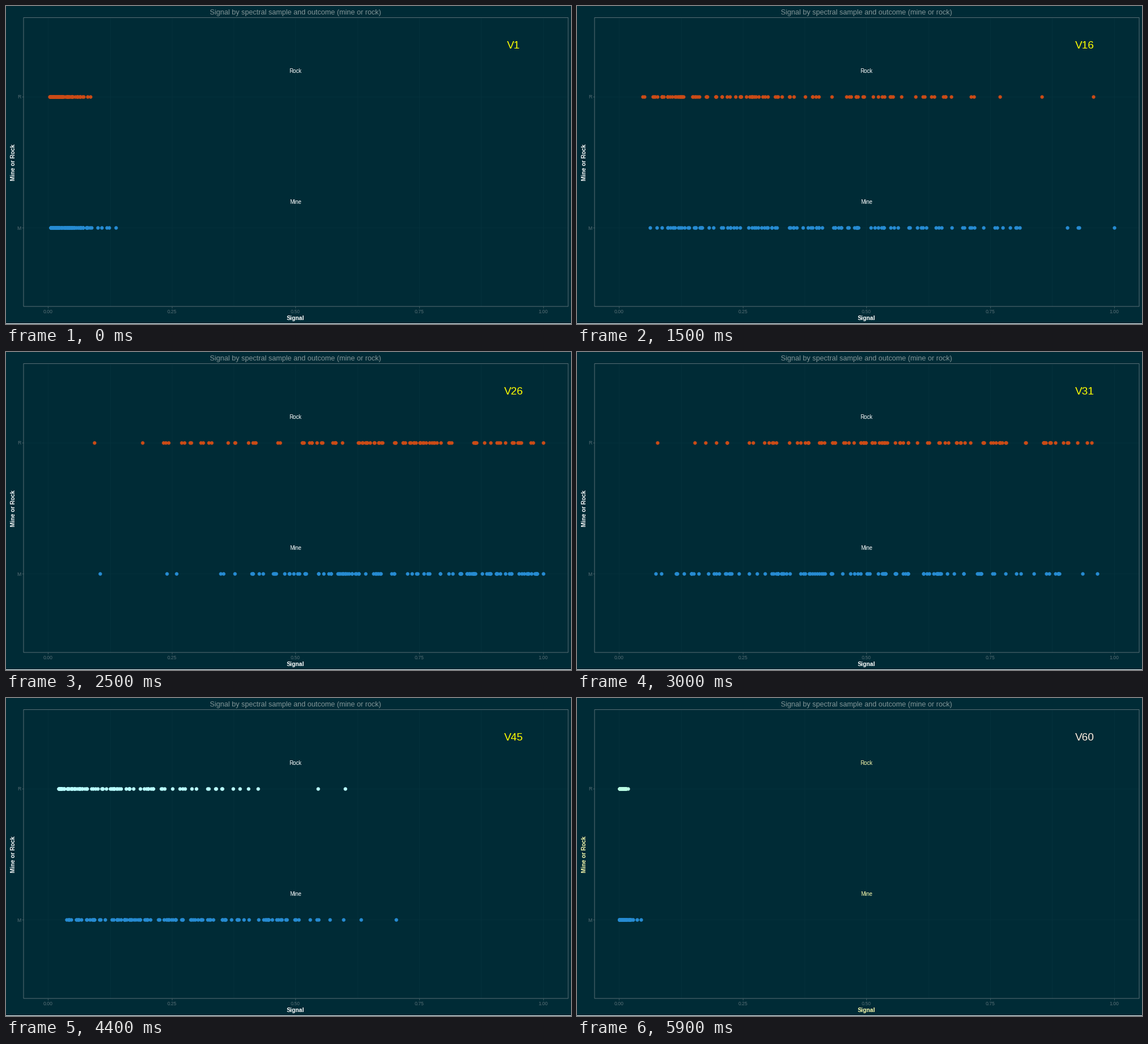
Write a matplotlib script that moves like this. It is 998 px wide and 561 px high and loops after 6000 ms.

```python
import matplotlib.pyplot as plt
import numpy as np
from matplotlib.animation import FuncAnimation
from matplotlib.patches import Rectangle

W, H, DPI = 998, 561, 100
FRAMES, INTERVAL = 60, 100
PX = 72 / DPI
BG, GRID, LINE, TICK = "#002b36", "#04303b", "#3f5960", "#586e75"
ORANGE, BLUE, MINT, CYAN = "#cb4b16", "#268bd2", "#b9fbe3", "#b9ffff"
ROCK_Y, MINE_Y = 159.6, 390.8
X0, XSPAN = 74.3, 874.3

# Key samples with the mean and largest signal of rocks, then of mines;
# the samples between them are interpolated.
KEYS = np.array([
    (1, .023, .086, .035, .137),
    (10, .16, .62, .25, .711),
    (15, .27, .95, .37, 1),
    (21, .54, 1, .66, 1),
    (28, .66, 1, .71, 1),
    (31, .52, .955, .49, .966),
    (37, .42, .95, .32, .94),
    (45, .14, .60, .25, .703),
    (50, .018, .08, .023, .083),
    (60, .006, .018, .008, .044),
])

plt.rcParams["font.family"] = "Liberation Sans"


def scatter(mean, top, count, rng):
    """Stage positions of beta-distributed signals with fixed ends."""
    low = .15 * mean
    centre = (mean - low) / (top - low)
    spread = rng.beta(3.5 * centre, 3.5 * (1 - centre), count - 2)
    unit = np.concatenate([[0], spread, [1]])
    return X0 + XSPAN * (low + (top - low) * unit)


def palette(frame):
    """Colours of rock dots, sample name and labels."""
    if frame < 36:
        return ORANGE, "#ffff00", "#ffffff"
    if 43 <= frame < 52:
        return CYAN, "#ffff00", "#ffffff"
    return MINT, "#ffefe0", "#ffffb0"


fig = plt.figure(figsize=(W / DPI, H / DPI), dpi=DPI, facecolor=BG)
ax = fig.add_axes([0, 0, 1, 1])
ax.set_xlim(0, W)
ax.set_ylim(H, 0)
ax.axis("off")


def line(x, y, color):
    ax.plot(x, y, color=color, lw=PX, solid_capstyle="butt", zorder=1)


def label(x, y, text, size, color, **kw):
    return ax.text(x, y, text, fontsize=size * PX, color=color, ha="center",
                   va="baseline", zorder=4, **kw)


def dots(color):
    return ax.plot([], [], "o", ms=6.3 * PX, mew=0, color=color, zorder=3)[0]


for i in range(9):
    x = X0 + XSPAN * i / 8
    line([x, x], [21, 530], GRID)
    if i % 2 == 0:
        line([x, x], [530, 533], LINE)
        label(x, 542, f"{i / 8:.2f}", 8.6, TICK)
for y, name in ((ROCK_Y, "R"), (MINE_Y, "M")):
    line([31, 993], [y, y], GRID)
    line([28, 31], [y, y], LINE)
    label(23, y + 3.7, name, 8.6, TICK)
ax.add_patch(Rectangle((31, 20.5), 962, 509.5, fill=False, ec=TICK,
                       lw=PX, snap=False, zorder=2))
ax.add_patch(Rectangle((0, 560), W, 1, fc="white", lw=0, zorder=2))

label(511.7, 14.5, "Signal by spectral sample and outcome (mine or rock)",
      12.6, "#839496")
labels = [
    label(511.5, 554.4, "Signal", 10.3, "white", weight="bold"),
    label(15.7, 275.5, "Mine or Rock", 10.3, "white", weight="bold",
          rotation=90, rotation_mode="anchor"),
    label(511.4, 117.5, "Rock", 9.6, "white"),
    label(511.2, 348.7, "Mine", 9.6, "white"),
]
sample = label(896.5, 74.7, "", 19, "yellow")
rock, mine = dots(ORANGE), dots(BLUE)


def update(frame):
    rng = np.random.default_rng(frame + 7)
    stats = [np.interp(frame + 1, KEYS[:, 0], column)
             for column in KEYS[:, 1:].T]
    for row, (mean, top), count, y in ((rock, stats[:2], 97, ROCK_Y),
                                       (mine, stats[2:], 111, MINE_Y)):
        row.set_data(scatter(mean, top, count, rng), np.full(count, y))
    dot, name, text_color = palette(frame)
    rock.set_color(dot)
    sample.set_text(f"V{frame + 1}")
    sample.set_color(name)
    for text in labels:
        text.set_color(text_color)
    return [rock, mine, sample, *labels]


anim = FuncAnimation(fig, update, frames=FRAMES, interval=INTERVAL,
                     repeat=True, repeat_delay=0, blit=False)
plt.show()
```
